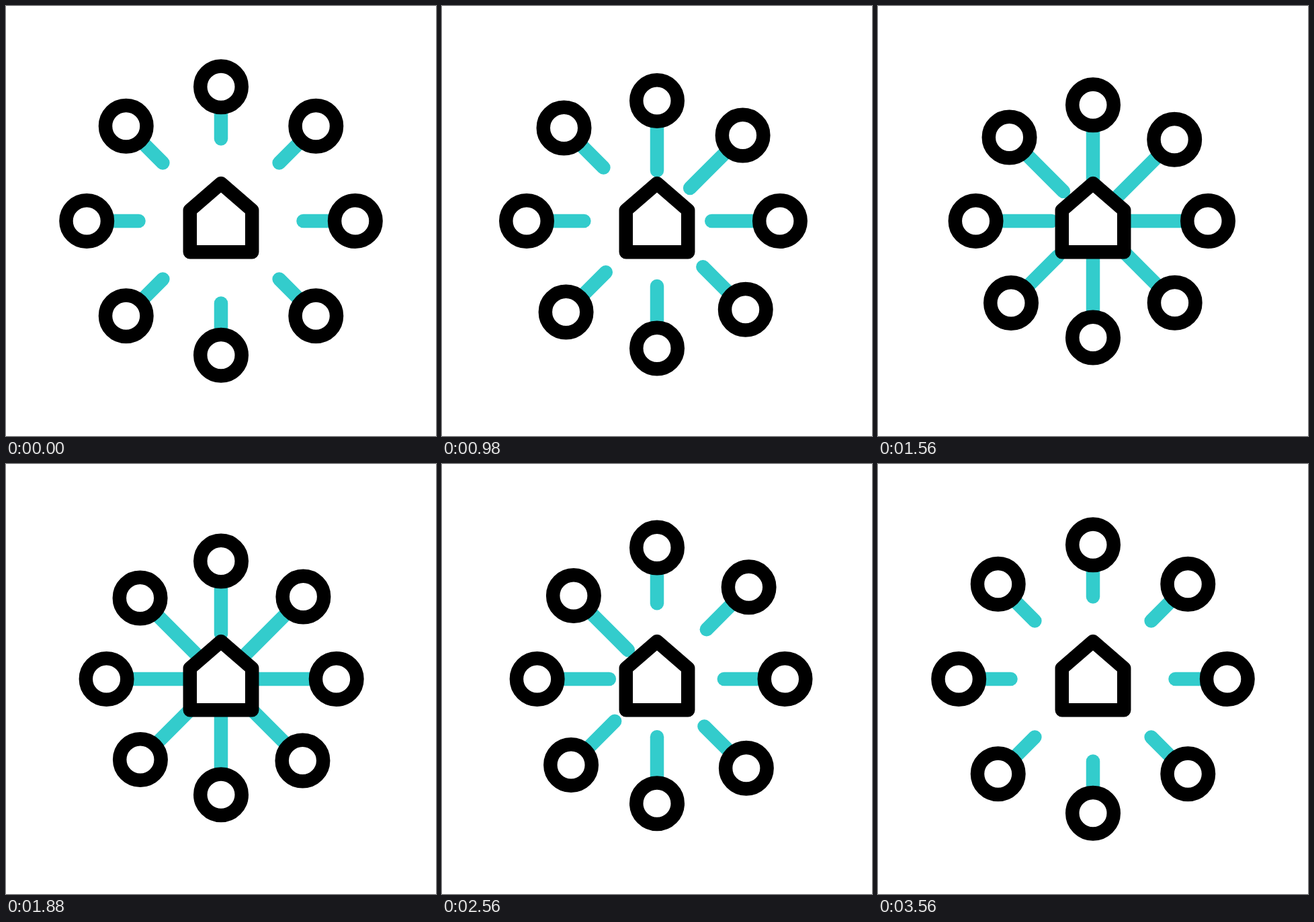
Recreate the animation shown at these times as an HTML page. Size 640 px wide and 640 px high, loop 3.6 s.

```html
<!DOCTYPE html>
<html lang="en">
<head>
<meta charset="utf-8">
<title>Home hub</title>
<style>
  html, body { margin: 0; width: 100%; height: 100%; overflow: hidden; background: #fff; }
  svg { display: block; width: 100%; height: 100%; }
  circle, .house { fill: #fff; stroke: #000; stroke-width: 20.5; stroke-linejoin: round; }
  line { stroke: #3cc; stroke-width: 20.5; stroke-linecap: round; }
</style>
</head>
<body>
<svg viewBox="0 0 640 640">
  <g id="spokes"></g>
  <path class="house" d="M320 264 366.2 304V366.2H273.8V304Z"/>
</svg>
<script>
const LOOP = 3600, START = 10, STAGGER = 80, HALF = 1500;
const RING = 199.8, TIP = 122.5, RADIUS = 30.75;

// Clockwise from the top: inward travel of the ring and of the line tip
const TRAVEL = [
  [27.2, 61.5], [28.4, 78], [29, 71], [28.4, 54.5],
  [27.6, 69], [30, 53.5], [29.6, 71], [30.2, 76.5]
];

const root = document.getElementById('spokes');

function add(parent, tag, attrs) {
  const el = document.createElementNS('http://www.w3.org/2000/svg', tag);
  for (const key in attrs) el.setAttribute(key, attrs[key]);
  return parent.appendChild(el);
}

const spokes = TRAVEL.map(([ring, tip], i) => {
  const g = add(root, 'g', { transform: `translate(320 320) rotate(${i * 45})` });
  return {
    ring, tip,
    delay: START + i * STAGGER,
    line: add(g, 'line', { x1: 0, x2: 0 }),
    circle: add(g, 'circle', { r: RADIUS })
  };
});

// cubic-bezier(.5, 0, .5, 1)
function ease(x) {
  let lo = 0, hi = 1;
  for (let i = 0; i < 24; i++) {
    const s = (lo + hi) / 2;
    if (1.5 * s * (1 - s) + s ** 3 < x) lo = s; else hi = s;
  }
  return lo * lo * (3 - 2 * lo);
}

// In and back out again
function pull(t) {
  const x = 1 - Math.abs(t / HALF - 1);
  return x > 0 ? ease(x) : 0;
}

function draw(t) {
  for (const s of spokes) {
    const p = pull(t - s.delay);
    const y = s.ring * p - RING;
    s.circle.setAttribute('cy', y);
    s.line.setAttribute('y1', y + RADIUS);
    s.line.setAttribute('y2', s.tip * p - TIP);
  }
}

const begin = performance.now();
function tick() {
  draw((performance.now() - begin) % LOOP);
  requestAnimationFrame(tick);
}
draw(0);
requestAnimationFrame(tick);
</script>
</body>
</html>
```
